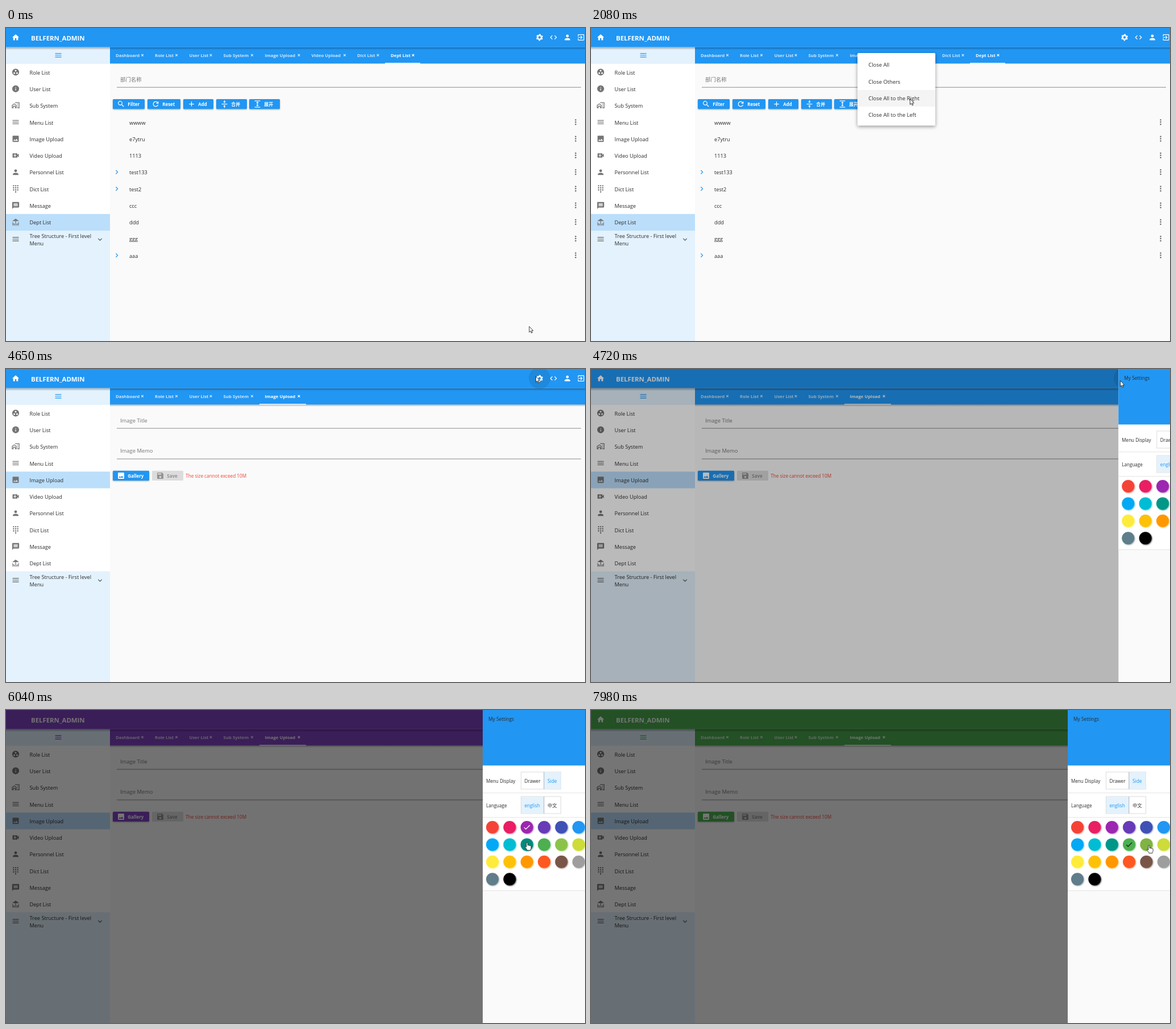
These frames come from a looping animation (1019x550 px, 8 s). An HTML page:

```html
<!DOCTYPE html>
<html lang="en">
<head>
<meta charset="utf-8">
<title>Admin console</title>
<style>
  html, body { margin: 0; width: 100%; height: 100%; overflow: hidden; background: #fafafa; }
  svg { display: block; width: 100vw; height: 100vh; }
  text { font-family: "Open Sans", "Noto Sans CJK SC", "Noto Sans CJK", sans-serif; white-space: pre; }
  .raised { filter: drop-shadow(0 1px 1px rgba(0, 0, 0, .35)); }
  .popup { filter: drop-shadow(0 2px 3px rgba(0, 0, 0, .4)); }
</style>
</head>
<body>
<svg id="stage" viewBox="0 0 1019 550" preserveAspectRatio="none"></svg>
<script>
const LOOP = 8000, TICK = 73.8;
const INK = '#2b2b2b', GREY = '#757575', BLUE = '#2196f3', PALE = '#e3f2fd';
const ICON = 0.61;

const dot = (x, y, r) => `M${x - r} ${y}a${r} ${r} 0 1 0 ${2 * r} 0a${r} ${r} 0 1 0 ${-2 * r} 0z`;
const disc = dot(12, 12, 10);

const icons = {
  home: 'M10 20v-6h4v6h5v-8h3L12 3 2 12h3v8z',
  code: 'M9.4 16.6L4.8 12l4.6-4.6L8 6l-6 6 6 6zm5.2 0l4.6-4.6-4.6-4.6L16 6l6 6-6 6z',
  person: dot(12, 8, 4) + 'M12 14c-2.67 0-8 1.34-8 4v2h16v-2c0-2.66-5.33-4-8-4z',
  exit: 'M10.1 15.6L11.5 17l5-5-5-5-1.4 1.4L12.7 11H3v2h9.7zM19 3H5c-1.1 0-2 .9-2 2v4h2V5h14v14H5v-4H3v4c0 1.1.9 2 2 2h14c1.1 0 2-.9 2-2V5c0-1.1-.9-2-2-2z',
  menu: 'M3 16h18v2H3zM3 11h18v2H3zM3 6h18v2H3z',
  group: disc + dot(8, 15, 2.5) + dot(12, 8, 2.5) + dot(16, 15, 2.5),
  info: disc + 'M11 11h2v6h-2zM11 7h2v2h-2z',
  works: 'M1 11l7-5 7 5v9h-5v-5H6v5H1zM3 12v6h1v-5h8v5h1v-6L8 8.4zM10 3h13v17h-6v-2h4V5h-9v1zM17 7h2v2h-2zM17 11h2v2h-2zM17 15h2v2h-2z',
  image: 'M21 19V5c0-1.1-.9-2-2-2H5c-1.1 0-2 .9-2 2v14c0 1.1.9 2 2 2h14c1.1 0 2-.9 2-2zM8.5 13.5l2.5 3L14.5 12l4.5 6H5z',
  video: 'M17 10.5V7c0-.6-.4-1-1-1H4c-.6 0-1 .4-1 1v10c0 .6.4 1 1 1h12c.6 0 1-.4 1-1v-3.5l4 4v-11zM14 13h-3v3H9v-3H6v-2h3V8h2v3h3z',
  dialpad: [3, 9, 15].flatMap(y => [6, 12, 18].map(x => dot(x, y, 2))).join('') + dot(12, 21, 2),
  message: 'M20 2H4c-1.1 0-2 .9-2 2v18l4-4h14c1.1 0 2-.9 2-2V4c0-1.1-.9-2-2-2zM6 12h12v2H6zM6 9h12v2H6zM6 6h12v2H6z',
  deck: 'M22 9L12 2 2 9h9v13h2V9zM4.1 12l-1.9.4.8 4.3V22h2v-4h2v4h2v-6H4.9zM19.1 16H15v6h2v-4h2v4h2v-5.3l.8-4.3-1.9-.4z',
  down: 'M16.6 8.6L12 13.2 7.4 8.6 6 10l6 6 6-6z',
  right: 'M10 6L8.6 7.4l4.6 4.6-4.6 4.6L10 18l6-6z',
  more: dot(12, 5.5, 2.1) + dot(12, 12, 2.1) + dot(12, 18.5, 2.1),
  search: 'M15.5 14h-.8l-.3-.3A6.5 6.5 0 1 0 13.7 14.4l.3.3v.8l5 5 1.5-1.5z' + dot(9.5, 9.5, 4.5),
  refresh: 'M17.65 6.35A8 8 0 1 0 19.73 14h-2.08A6 6 0 1 1 16.22 7.78L13 11h7V4z',
  add: 'M19 13h-6v6h-2v-6H5v-2h6V5h2v6h6z',
  merge: 'M8 19h3v4h2v-4h3l-4-4zM16 5h-3V1h-2v4H8l4 4zM4 11v2h16v-2z',
  expand: 'M4 20h16v2H4zM4 2h16v2H4zM13 9h3l-4-4-4 4h3v6H8l4 4 4-4h-3z',
  save: 'M17 3H5c-1.1 0-2 .9-2 2v14c0 1.1.9 2 2 2h14c1.1 0 2-.9 2-2V7zM15 9H5V5h10z' + dot(12, 16, 3),
  check: 'M9 16.2L4.8 12l-1.4 1.4L9 19 21 7l-1.4-1.4z'
};

const icon = (name, x, y, fill = GREY, s = ICON, extra = '') =>
  `<path d="${icons[name]}" fill="${fill}" fill-rule="evenodd" transform="translate(${x - 12 * s} ${y - 12 * s}) scale(${s})" ${extra}/>`;
const text = (s, x, y, size, fill = INK, extra = '') =>
  `<text x="${x}" y="${y}" font-size="${size}" fill="${fill}" ${extra}>${s}</text>`;
const bold = (s, x, y, size, fill = '#fff', extra = '') => text(s, x, y, size, fill, 'font-weight="700" ' + extra);
const rect = (x, y, w, h, fill, extra = '') =>
  `<rect x="${x}" y="${y}" width="${w}" height="${h}" fill="${fill}" ${extra}/>`;
const rowY = i => 78 + i * 29.3;

const button = (name, label, x, y, w, fill = 'currentColor', ink = '#fff') =>
  rect(x, y, w, 17.3, fill, `rx="1.5" ${ink === '#fff' ? 'class="raised"' : ''}`) +
  icon(name, x + 14.5, y + 8.6, ink) + bold(label, x + 26.3, y + 11.8, 7.9, ink);

const field = (label, y) => text(label, 201, y + 3.6, 9.4, GREY) + rect(195, y + 13.7, 817, 1, '#8c8c8c');

// Sidebar
const entries = [['Role List', 'group'], ['User List', 'info'], ['Sub System', 'works'], ['Menu List', 'menu'],
  ['Image Upload', 'image'], ['Video Upload', 'video'], ['Personnel List', 'person'], ['Dict List', 'dialpad'],
  ['Message', 'message'], ['Dept List', 'deck']];
const sidebar = rect(0, 33.5, 183, 517, PALE) + rect(0, 63, 183, 292.5, '#fff') +
  rect(0, 0, 183, 29.3, '#bbdefb', 'id="selected"') +
  icon('menu', 92, 48, 'currentColor') +
  entries.map(([label, name], i) => icon(name, 17, rowY(i) - .5) + text(label, 41.5, rowY(i) + 3.6, 9.2)).join('') +
  icon('menu', 17, 371, '#616161') + icon('down', 165.5, 371.5, '#555') +
  text('Tree Structure - First level', 41.5, 369, 9.2) + text('Menu', 41.5, 382, 9.2);

// Tabs: label, text start, centre of the close mark
const tabs = [['Dashboard', 193, 240], ['Role List', 262, 300], ['User List', 322.5, 360.5], ['Sub System', 382.5, 433],
  ['Image Upload', 455.5, 515.5], ['Video Upload', 537.5, 596], ['Dict List', 618, 654.5], ['Dept List', 677, 716.5]];
const tabBar = rect(183, 33.5, 836, 29, 'currentColor') +
  tabs.map(([label, x, cx]) => `<g class="tab">${bold(label, x, 51, 7.8)}
    <path d="M${cx - 1.8} 46l3.6 3.6m0-3.6l-3.6 3.6" stroke="#fff" stroke-width="1.2"/></g>`).join('') +
  rect(0, 61.2, 0, 1.5, '#fff', 'id="indicator"');

const gear = `<g transform="translate(939 16.5) scale(${ICON})" fill="none" stroke="#fff">
  <circle r="5.6" stroke-width="4"/>
  <circle r="8.3" stroke-width="3" stroke-dasharray="4.2 4.49" stroke-dashoffset="-2.25"/></g>`;
const topBar = rect(0, 33.5, 1019, 5, 'url(#shade)') + rect(0, 0, 1019, 33.5, 'currentColor') +
  icon('home', 17, 16.5, '#fff', ICON, 'id="home"') + bold('BELFERN_ADMIN', 44, 21.7, 11.4) +
  '<circle id="halo" cx="939" cy="16" r="19"/>' + gear +
  icon('code', 963.5, 16.5, '#fff') + icon('person', 988, 16.5, '#fff') + icon('exit', 1012, 16.5, '#fff');

// Pages
const names = ['wwww', 'e7ytru', '1113', 'test133', 'test2', 'ccc', 'ddd', 'ggg', 'aaa'];
const deptPage = field('部门名称', 90) +
  button('search', 'Filter', 188, 125, 56) + button('refresh', 'Reset', 249, 125, 58) +
  button('add', 'Add', 312, 125, 53) + button('merge', '合并', 370, 125, 54) + button('expand', '展开', 428, 125, 54) +
  names.map((s, i) => {
    const y = 166 + i * 29.25;
    return text(s, 217, y + 3.6, 9.2) + icon('more', 1002.5, y - .7, '#666', .6) +
      ([3, 4, 8].includes(i) ? icon('right', 195, y - .5, BLUE) : '');
  }).join('');
const imagePage = rect(183, 62.5, 836, 3.5, 'url(#shade)') + field('Image Title', 90) + field('Image Memo', 143.8) +
  button('image', 'Gallery', 188, 178.8, 64) + button('save', 'Save', 257, 178.8, 55, '#dcdcdc', '#929292') +
  text('The size cannot exceed 10M', 316.3, 191, 8.2, '#f44336');

// Context menu
const choices = ['Close All', 'Close Others', 'Close All to the Right', 'Close All to the Left'];
const popup = `<g id="popup" class="popup"><rect id="sheet" x="469" y="44" fill="#fff" rx="1.5"/>
  ${rect(469, 0, 137, 29.3, '#f4f4f4', 'id="hover"')}
  ${choices.map((s, i) => text(s, 488.3, 68.4 + i * 29.3, 9.4, INK, 'class="choice"')).join('')}</g>`;

// Settings drawer, in its own coordinates
const palette = ['#f44336', '#e91e63', '#9c27b0', '#673ab7', '#3f51b5', BLUE,
  '#03a9f4', '#00bcd4', '#009688', '#4caf50', '#8bc34a', '#cddc39',
  '#ffeb3b', '#ffc107', '#ff9800', '#ff5722', '#795548', '#9e9e9e', '#607d8b', '#000000'];
const swatchAt = i => [17 + (i % 6) * 30.35, 206 + Math.floor(i / 6) * 30.4];
const toggle = (y, a, b, on) => rect(67.5, y, 70, 30, '#fff', 'stroke="#dcdcdc"') +
  rect(on ? 108 : 68, y + .5, on ? 29.5 : 40, 29, PALE) + rect(107.3, y, 1, 30, '#a9b4bd') +
  text(a, 73.5, y + 18.5, 8.2, on ? INK : BLUE) + text(b, 114, y + 18.5, 8.4, on ? BLUE : INK);
const drawer = '<g id="drawer">' + rect(0, 0, 181, 550, '#fafafa') + rect(0, 97, 181, 220, '#fff') +
  rect(0, 0, 181, 97.5, BLUE) + text('My Settings', 10, 18.5, 8.4) +
  text('Menu Display', 6, 127.8, 8.1) + text('Language', 6, 171, 8.1) +
  toggle(109, 'Drawer', 'Side', true) + toggle(152, 'english', '中文', false) +
  [145.3, 188.3, 317].map(y => rect(0, y, 181, .9, '#e2e2e2')).join('') +
  palette.map((c, i) => {
    const [x, y] = swatchAt(i);
    return `<circle cx="${x}" cy="${y}" r="11" fill="${c}" style="filter:drop-shadow(1px 1.5px 1.2px ${c}aa)"/>`;
  }).join('') +
  '<circle id="glow" r="11" fill="#000" opacity=".08"/>' + `<g id="tick">${icon('check', 0, 0, 'inherit')}</g></g>`;

const pointers = `<g id="pointer" stroke="#111" stroke-width=".8" stroke-linejoin="round" fill="#fff">
  <path id="arrow" d="M.4 .4V10.6L2.7 8.5 4.3 12 5.9 11.3 4.3 7.9H7.4z"/>
  <path id="hand" d="M-1.2 8V1a1.2 1.2 0 0 1 2.4 0V5a1.1 1.1 0 0 1 2.1 .3a1.1 1.1 0 0 1 2 .4a1 1 0 0 1 1.8 .6V9.5C7.1 11.5 6 12 6 13.5H0C0 12-2.5 9.5-3.8 7.6C-4 6.5-2.8 6.3-1.2 8z"/></g>`;

const stage = document.getElementById('stage');
stage.innerHTML = `<defs><linearGradient id="shade" x2="0" y2="1">
  <stop stop-opacity=".3"/><stop offset="1" stop-opacity="0"/></linearGradient></defs>
  ${rect(0, 0, 1019, 550, '#fafafa')}
  <g id="dept">${deptPage}</g><g id="image">${imagePage}</g>
  ${sidebar}${tabBar}${topBar}${popup}
  ${rect(0, 0, 1019, 550, '#000', 'id="scrim"')}${drawer}${pointers}`;

const el = id => document.getElementById(id);
const set = (node, attrs) => { for (const k in attrs) node.setAttribute(k, attrs[k]); };
const show = (id, on) => set(el(id), { visibility: on ? 'visible' : 'hidden' });
const clamp = v => Math.min(1, Math.max(0, v));
const ramp = (v, from, to) => clamp((v - from) / (to - from));
const mix = (a, b, k) => a + (b - a) * k;
const rgb = hex => [1, 3, 5].map(i => parseInt(hex.slice(i, i + 2), 16));

// Pointer path: time, x, y
const path = [[0, 920.5, 524], [60, 920.5, 524], [640, 469, 44], [1240, 469, 44], [1600, 543, 135], [1998, 543, 135],
  [2066, 561, 124], [2214, 595, 109.5], [2350, 595, 109.5], [2600, 539, 137], [2900, 539, 137], [2990, 536, 128.5],
  [3170, 536, 128.5], [3468, 810, 65], [3910, 976, 33], [4055, 932, 12.5], [4650, 932, 12.5], [4797, 930.5, 28],
  [5160, 915, 233], [5400, 915, 233], [5700, 917, 203], [5900, 917, 203], [6050, 917, 233], [6550, 917, 233],
  [7010, 938, 230], [7200, 937, 229], [7370, 937, 229], [7650, 993, 236], [7800, 993, 236], [7968, 982, 238]];
function pointerAt(t) {
  const i = path.findIndex(p => p[0] > t);
  if (i < 0) return path[path.length - 1].slice(1);
  const [a, b] = [path[i - 1], path[i]], k = ramp(t, a[0], b[0]);
  return [mix(a[1], b[1], k), mix(a[2], b[2], k)];
}

// Theme choices: time, palette index
const themes = [[-500, 5], [5900, 2], [6490, 8], [7370, 9]];
const OPEN_MENU = 860, CLOSE_MENU = 3234, PRESS_GEAR = 4420, OPEN_DRAWER = 4650;

function drawPopup(t, x, y) {
  const v = t < CLOSE_MENU ? ramp(t, OPEN_MENU, OPEN_MENU + 300)
    : clamp((1 - (t - CLOSE_MENU) / 300) * 1.5);
  const unit = 1 / 5.5, height = 127.5 * ramp(v, 0, 4 * unit);
  set(el('popup'), { opacity: ramp(v, 0, 1 / 3), visibility: v > 0 ? 'visible' : 'hidden' });
  set(el('sheet'), { width: 137 * ramp(v, 0, unit), height });
  const row = Math.floor((y - 50.2) / 29.3);
  const over = v === 1 && x > 469 && x < 606 && row >= 0 && row < 4;
  set(el('hover'), { y: 50.2 + row * 29.3, opacity: over ? 1 : 0 });
  document.querySelectorAll('.choice').forEach((node, i) =>
    set(node, { opacity: ramp(v, (i + 1) * unit, Math.min(1, (i + 2.5) * unit)) }));
}

function draw(ms) {
  const t = Math.floor((ms % LOOP + 15) / TICK) * TICK;
  const [x, y] = pointerAt(t);

  const onImage = t >= CLOSE_MENU;
  show('dept', !onImage);
  show('image', onImage);
  set(el('selected'), { y: rowY(onImage ? 4 : 9) - 14.9 });
  set(el('indicator'), onImage ? { x: 446, width: 82 } : { x: 667, width: 62 });
  document.querySelectorAll('.tab').forEach((node, i) => set(node, {
    visibility: onImage && i > 4 ? 'hidden' : 'visible',
    opacity: i === (onImage ? 4 : 7) ? 1 : .78
  }));
  drawPopup(t, x, y);

  const n = themes.findLastIndex(th => th[0] <= t);
  const chosen = themes[n][1], fade = ramp(t, themes[n][0], themes[n][0] + 200);
  const from = rgb(palette[themes[Math.max(0, n - 1)][1]]), to = rgb(palette[chosen]);
  stage.style.color = `rgb(${from.map((c, i) => Math.round(mix(c, to[i], fade)))})`;
  show('home', fade === 1);

  const s = Math.max(0, t - OPEN_DRAWER) / 1000, w = 23.1;
  const open = 1 - (1 + w * s) * Math.exp(-w * s);
  const left = 1019 - 180 * open;
  set(el('scrim'), { opacity: .54 * open });
  set(el('drawer'), { transform: `translate(${left})`, visibility: open > 0 ? 'visible' : 'hidden' });
  const near = Math.hypot(x - 939, y - 16) < 19 && t < OPEN_DRAWER + 100;
  set(el('halo'), { opacity: near ? (t > PRESS_GEAR ? .09 : .05) : 0 });

  const over = open > .9 ? palette.findIndex((c, i) => {
    const [cx, cy] = swatchAt(i);
    return Math.hypot(x - left - cx, y - cy) < 11;
  }) : -1;
  const [gx, gy] = swatchAt(Math.max(0, over));
  set(el('glow'), { cx: gx, cy: gy, opacity: over < 0 ? 0 : .08 });
  set(el('tick'), { transform: `translate(${swatchAt(chosen)})`, fill: chosen === 9 ? '#111' : '#fff' });

  set(el('pointer'), { transform: `translate(${x} ${y})` });
  show('arrow', over < 0);
  show('hand', over >= 0);
}

const start = performance.now();
function tick(now) {
  draw(Math.max(0, now - start));
  requestAnimationFrame(tick);
}
draw(0);
requestAnimationFrame(tick);
</script>
</body>
</html>
```
